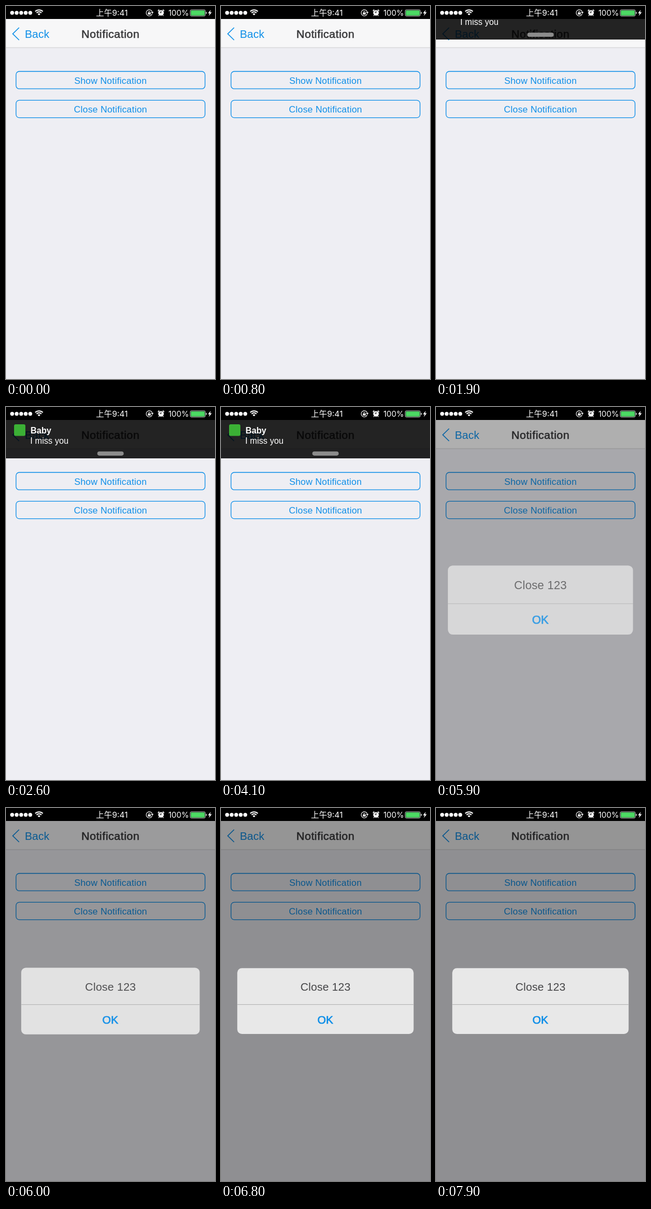
Animation of 388x690 px, one loop 8 s. Source, as an HTML page with a canvas:

```html
<!DOCTYPE html>
<html lang="en">
<head>
<meta charset="utf-8">
<title>Notification</title>
<style>
html, body { margin: 0; width: 100%; height: 100%; overflow: hidden; background: #eeeef3; }
canvas { display: block; width: 388px; height: 690px; }
</style>
</head>
<body>
<canvas id="stage"></canvas>
<script>
const W = 388, H = 690, LOOP = 8000, STEP = 100, TAU = Math.PI * 2;
const BLUE = '#0f8fe8', SANS = '"Liberation Sans", Arial, sans-serif';
const STATUS_FONT = 'Inter, "Noto Sans CJK SC", "Noto Sans CJK", sans-serif';
const PANEL_H = 95;

const canvas = document.getElementById('stage');
const dpr = window.devicePixelRatio || 1;
canvas.width = W * dpr;
canvas.height = H * dpr;
const ctx = canvas.getContext('2d');

// CSS "ease": cubic-bezier(.25, .1, .25, 1), solved by bisection
function ease(x) {
  if (x <= 0) return 0;
  if (x >= 1) return 1;
  const bez = (a, b, u) => 3 * a * u * (1 - u) ** 2 + 3 * b * u * u * (1 - u) + u ** 3;
  let lo = 0, hi = 1;
  for (let i = 0; i < 24; i++) {
    const mid = (lo + hi) / 2;
    if (bez(0.25, 0.25, mid) < x) lo = mid; else hi = mid;
  }
  return bez(0.1, 1, lo);
}

const progress = (t, start, length) => ease((t - start) / length);

function rect(x, y, w, h, fill) {
  ctx.fillStyle = fill;
  ctx.fillRect(x, y, w, h);
}

function round(x, y, w, h, r, fill, stroke, line) {
  ctx.beginPath();
  ctx.roundRect(x, y, w, h, r);
  if (fill) { ctx.fillStyle = fill; ctx.fill(); }
  if (stroke) { ctx.strokeStyle = stroke; ctx.lineWidth = line; ctx.stroke(); }
}

function disc(x, y, r, fill) {
  ctx.beginPath();
  ctx.arc(x, y, r, 0, TAU);
  ctx.fillStyle = fill;
  ctx.fill();
}

function path(points, color, width) {
  ctx.beginPath();
  points.forEach(([x, y]) => ctx.lineTo(x, y));
  ctx.strokeStyle = color;
  ctx.lineWidth = width;
  ctx.stroke();
}

function text(str, x, y, size, color, o = {}) {
  ctx.font = `${o.weight || 400} ${size}px ${o.font || SANS}`;
  ctx.textAlign = o.align || 'left';
  ctx.letterSpacing = (o.gap || 0) + 'px';
  ctx.fillStyle = color;
  ctx.fillText(str, x, y);
  if (o.medium) {
    ctx.strokeStyle = color;
    ctx.lineWidth = o.medium;
    ctx.lineJoin = 'round';
    ctx.strokeText(str, x, y);
    ctx.lineJoin = 'miter';
  }
}

function wifi(x, y) {
  ctx.strokeStyle = '#fff';
  ctx.lineWidth = 2;
  for (const r of [10, 6.4]) {
    ctx.beginPath();
    ctx.arc(x, y, r, -Math.PI * 0.75, -Math.PI * 0.25);
    ctx.stroke();
  }
  ctx.beginPath();
  ctx.moveTo(x, y);
  ctx.arc(x, y, 3.6, -Math.PI * 0.75, -Math.PI * 0.25);
  ctx.fillStyle = '#fff';
  ctx.fill();
}

function rotationLock(x, y) {
  ctx.strokeStyle = '#fff';
  ctx.lineWidth = 1.1;
  ctx.beginPath();
  ctx.arc(x, y, 5.7, 0.35, TAU - 0.1);
  ctx.stroke();
  path([[x + 3.6, y - 1.4], [x + 5.7, y + 0.6], [x + 7.5, y - 1.4]], '#fff', 1.1);
  rect(x - 2.6, y - 0.6, 5.2, 3.8, '#fff');
  ctx.beginPath();
  ctx.arc(x, y - 1, 1.6, Math.PI, TAU);
  ctx.stroke();
}

function alarm(x, y) {
  disc(x - 4, y - 4.2, 1.9, '#fff');
  disc(x + 4, y - 4.2, 1.9, '#fff');
  path([[x - 4.5, y + 5.6], [x, y], [x + 4.5, y + 5.6]], '#fff', 1.4);
  disc(x, y, 5.8, '#000');
  disc(x, y, 5.2, '#fff');
  path([[x - 2.6, y - 1.8], [x, y + 0.4], [x + 0.2, y - 3.4]], '#000', 1);
}

function battery() {
  round(342, 7, 28, 11.6, 2.2, null, '#c9d3cb', 1);
  round(343.2, 8.2, 25.6, 9.2, 1.2, '#4cd964');
  round(371, 10.8, 1.6, 4, 0.8, '#c9d3cb');
  ctx.beginPath();
  [[380, 7], [375, 13.6], [378, 13.6], [376.4, 18.6], [382, 11.6], [378.9, 11.6]]
    .forEach(([x, y]) => ctx.lineTo(x, y));
  ctx.fillStyle = '#fff';
  ctx.fill();
}

function statusBar() {
  rect(0, 0, W, 24, '#000');
  for (let i = 0; i < 5; i++) disc(11.4 + i * 8.4, 12.6, 3.6, '#fff');
  wifi(61.3, 17.2);
  text('上午9:41', 196.5, 18, 15, '#fff', { font: STATUS_FONT, align: 'center' });
  rotationLock(266, 12.6);
  alarm(287.8, 12.6);
  text('100%', 301.5, 18, 14.4, '#fff', { font: STATUS_FONT });
  battery();
}

function button(label, y) {
  round(18.6, y, 350.9, 32.2, 6, null, BLUE, 1.3);
  text(label, W / 2, y + 22.6, 17, BLUE, { align: 'center', gap: 0.2 });
}

function page() {
  rect(0, 0, W, H, '#eeeef3');
  rect(0, 24, W, 53, '#f7f7f8');
  rect(0, 76.5, W, 1, '#cdcdd0');
  path([[24.3, 40], [12.6, 51.5], [24.3, 63]], BLUE, 1.7);
  text('Back', 35, 58.6, 20.4, BLUE);
  text('Notification', W / 2, 58.6, 20.6, '#3b3b3d', { align: 'center', gap: 0.5, medium: 0.6 });
  button('Show Notification', 121);
  button('Close Notification', 174.4);
}

function panel(shown) {
  if (shown <= 0) return;
  ctx.save();
  ctx.translate(0, (shown - 1) * PANEL_H);
  rect(0, 0, W, PANEL_H, 'rgba(0,0,0,.86)');
  round(15, 32, 21, 21.5, 3, '#3bb035');
  text('Baby', 45.5, 49, 15.8, '#fff', { weight: 700 });
  text('I miss you', 45, 68, 15.8, '#fff');
  round(169.5, 82.3, 49, 7.6, 3.8, '#8c8c8c');
  ctx.restore();
}

function dialog(p) {
  if (p <= 0) return;
  rect(0, 0, W, H, `rgba(0,0,0,${0.4 * p})`);
  const zoom = 1.185 - 0.185 * p;
  ctx.save();
  ctx.globalAlpha = p;
  ctx.translate(W / 2, 357);
  ctx.scale(zoom, zoom);
  ctx.translate(-W / 2, -357);
  round(30.2, 296.2, 327.4, 121.8, 8.5, '#e8e8e8');
  rect(30.2, 363, 327.4, 1.1, '#b4b4b4');
  text('Close 123', W / 2, 338, 20.4, '#454547', { align: 'center', gap: 0.15 });
  text('OK', 193.7, 398.5, 20.4, BLUE, { align: 'center', medium: 0.7 });
  ctx.restore();
}

function draw(now) {
  const t = Math.floor((now % LOOP) / STEP) * STEP;
  ctx.setTransform(dpr, 0, 0, dpr, 0, 0);
  page();
  dialog(progress(t, 5725, 400));
  panel(progress(t, 1729, 450) - progress(t, 5725, 350));
  statusBar();
}

const start = performance.now();
function tick() {
  draw(performance.now() - start);
  requestAnimationFrame(tick);
}
tick();
</script>
</body>
</html>
```
